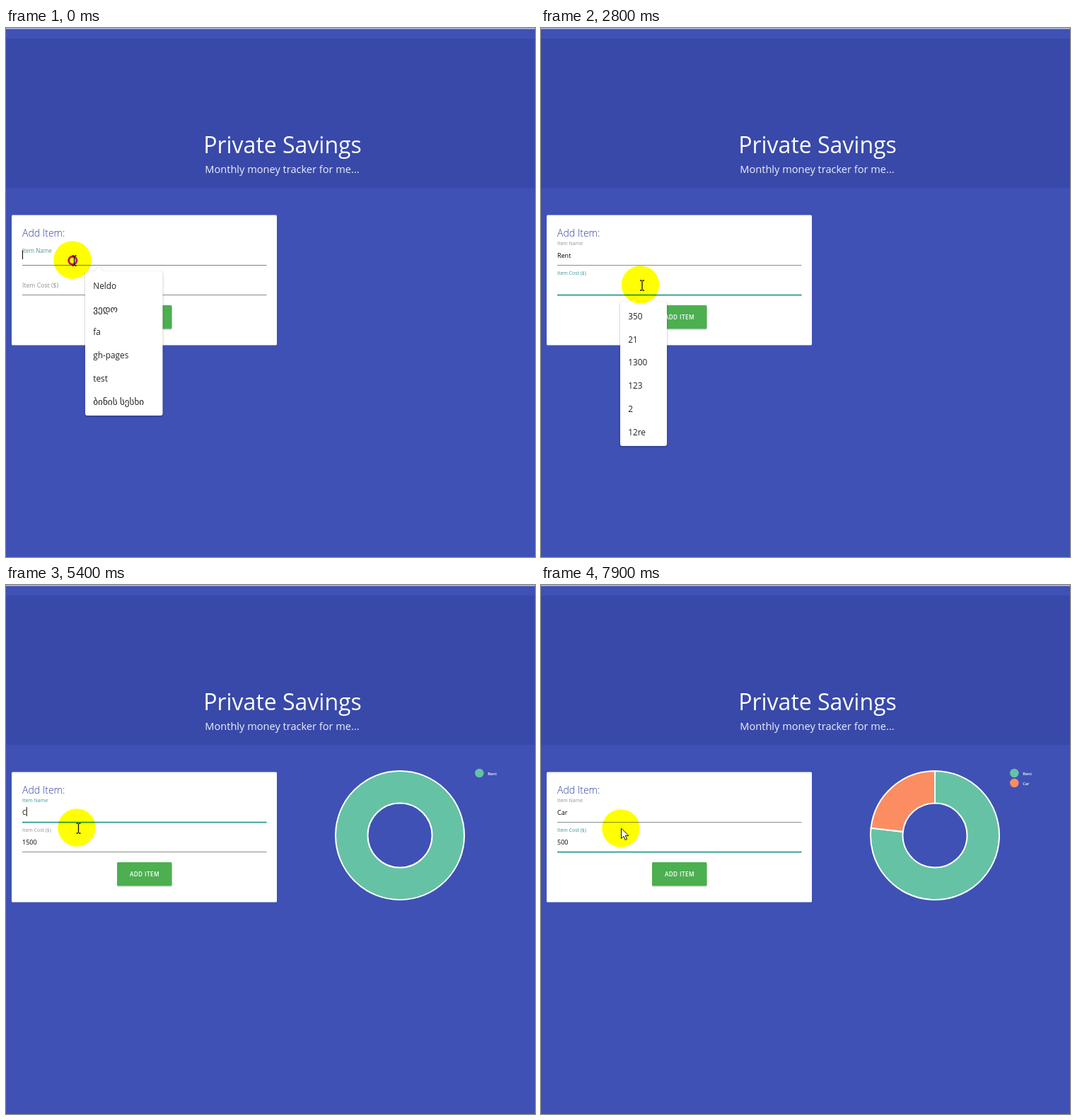
Recreate the animation shown at these times as an HTML page. Size 748x748 px, loop 8 s.

```html
<!DOCTYPE html>
<html lang="en">
<head>
<meta charset="utf-8">
<title>Money tracker</title>
<style>
  html, body { margin: 0; width: 100%; height: 100%; overflow: hidden; background: #3f51b5; }
  svg { display: block; width: 748px; height: 748px; font-family: "Open Sans", "Noto Sans", "DejaVu Sans", sans-serif; }
  text { white-space: pre; }
  .title { font-size: 32px; fill: #fff; text-anchor: middle; }
  .sub { font-size: 14.6px; fill: #eceefa; text-anchor: middle; }
  .head { font-size: 14px; font-weight: 300; fill: #303f9f; }
  .label { font-size: 8.7px; }
  .value { font-size: 9px; fill: #000; }
  .btn { font-size: 8.2px; font-weight: 600; letter-spacing: .4px; fill: #fff; text-anchor: middle; }
  .menu { filter: drop-shadow(0 1px 1.5px rgba(0, 0, 0, .3)); }
  .menu text { font-size: 11.8px; fill: #222; }
  .menu .ka { font-size: 13.2px; }
  .legend text { font-size: 5.6px; font-weight: 600; fill: #fff; }
  .halo { fill: #ff0; mix-blend-mode: multiply; }
  .arc { stroke: #fff; stroke-width: 2; fill-rule: evenodd; }
</style>
</head>
<body>
<svg viewBox="0 0 748 748">
  <rect width="748" height="748" fill="#3f51b5"/>
  <rect y="15" width="748" height="211" fill="#3949a9"/>
  <rect width="748" height="1.5" fill="#b4c0e0"/>
  <text class="title" x="391" y="177">Private Savings</text>
  <text class="sub" x="390.5" y="205">Monthly money tracker for me...</text>

  <rect x="8" y="264.5" width="375" height="184" rx="1.5" fill="#fff"/>
  <text class="head" x="23" y="294.5">Add Item:</text>
  <g id="fields"></g>
  <rect x="157" y="393.5" width="77.5" height="33" rx="1.5" fill="#000" opacity=".22"/>
  <rect x="157" y="392" width="77.5" height="33.3" rx="1.5" fill="#4caf50"/>
  <text class="btn" x="195.9" y="412">ADD ITEM</text>

  <g id="chart" transform="translate(557 354)"></g>
  <g id="legend" class="legend"></g>
  <g id="menus"></g>

  <circle id="halo" class="halo" r="26.7"/>
  <g id="pointer">
    <circle id="ring" cx=".3" cy=".8" r="5.6" fill="none" stroke="#c2185b" stroke-width="3"/>
    <path id="beam" d="M-.5-6h2.4M3.1-6h2.4M2.5-5.5v13M-.5 8h2.4M3.1 8h2.4" fill="none" stroke="#111" stroke-width="1.3"/>
    <path id="arrow" d="M.5 0v14.5l3.4-3.2 2.3 5.2 2.3-1-2.3-5.1h4.6z" fill="#fff" stroke="#111"/>
  </g>
</svg>
<script>
  const LOOP = 8000, STEP = 100, TAU = Math.PI * 2;
  const GREEN = "#66c2a5", ORANGE = "#fc8d62";
  const $ = id => document.getElementById(id);
  const clamp = x => Math.min(1, Math.max(0, x));
  const ramp = (t, start, dur) => clamp((t - start) / dur);
  const inOut = x => x < .5 ? 4 * x ** 3 : 1 - 4 * (1 - x) ** 3;
  const easeOut = x => 1 - (1 - x) ** 2;
  const smooth = x => x * x * (3 - 2 * x);
  const show = (el, on) => el.setAttribute("visibility", on ? "visible" : "hidden");

  function add(parent, tag, attrs, text) {
    const el = document.createElementNS("http://www.w3.org/2000/svg", tag);
    for (const k in attrs) el.setAttribute(k, attrs[k]);
    if (text) el.textContent = text;
    return parent.appendChild(el);
  }

  // [time, field, value after the keystroke or click]
  const inputs = [
    [-40, 0, ""], [850, 0, "R"], [1000, 0, "Re"], [1100, 0, "Ren"], [1200, 0, "Rent"],
    [2250, 1, ""], [3000, 1, "1"], [3100, 1, "15"], [3300, 1, "150"], [3400, 1, "1500"],
    [4720, 0, "Rent"], [5100, 0, ""], [5400, 0, "C"], [5550, 0, "Ca"], [5700, 0, "Car"],
    [6300, 1, "1500"], [6900, 1, "5"], [7000, 1, "50"], [7100, 1, "500"]
  ];
  // [time, x, y]
  const path = [
    [0, 94, 328], [100, 98, 322], [400, 132, 189], [800, 146, 343], [1700, 146, 343],
    [2200, 140.5, 363], [3900, 140.5, 363], [4300, 123, 326.5], [4700, 92, 323],
    [4900, 100, 343], [5450, 100, 343], [5800, 195, 368], [5900, 195, 368],
    [6200, 53, 363], [6300, 53, 363], [6700, 45, 363], [7300, 51, 363], [7900, 113, 344]
  ];
  const presses = [[0, 100], [2250, 2450], [4720, 4850], [6260, 6650]];

  const fields = [
    { y: 335, label: "Item Name", focus: [[-40, 2250], [4720, 6300]] },
    { y: 377, label: "Item Cost ($)", focus: [[2250, 4720], [6300, LOOP]] }
  ];
  for (const f of fields) {
    const g = $("fields");
    add(g, "rect", { x: 23, y: f.y, width: 345.5, height: 1, fill: "#868d8e" });
    f.line = add(g, "rect", { x: 23, y: f.y - .3, width: 345.5, height: 1.8, fill: "#2a9a94" });
    f.name = add(g, "text", { class: "label" }, f.label);
    f.value = add(g, "text", { class: "value", x: 23, y: f.y - 10 });
    f.caret = add(g, "rect", { y: f.y - 21, width: 1, height: 13, fill: "#000" });
  }

  function menu(y, width, rows, from, to) {
    const g = add($("menus"), "g", { class: "menu" });
    add(g, "rect", { x: 112, y, width, height: 204, rx: 3, fill: "#fff" });
    add(g, "path", { d: `M124.5 ${y + .5}l7-7 7 7z`, fill: "#fff" });
    rows.forEach((row, i) => add(g, "text", {
      x: 123.3, y: y + 24.7 + i * 32.8, class: row > "\u1000" ? "ka" : "la"
    }, row));
    return { g, from, to };
  }
  const menus = [
    menu(344, 109.5, ["Neldo", "ვედო", "fa", "gh-pages", "test", "ბინის სესხი"], 0, 850),
    menu(387, 66, ["350", "21", "1300", "123", "2", "12re"], 2350, 3000)
  ];

  function slice(color, label, y, start) {
    const key = add($("legend"), "g", {});
    add(key, "circle", { cx: 669.3, cy: y, r: 6.2, fill: color });
    add(key, "text", { x: 681.3, y: y + 2.7 }, label);
    return { arc: add($("chart"), "path", { class: "arc", fill: color }), key, start };
  }
  const rent = slice(GREEN, "Rent", 266, 3600);
  const car = slice(ORANGE, "Car", 280, 7347);

  function ringPath(a, b) {
    const R = 91, r = 45.5;
    if (b - a > TAU - 1e-6)
      return [R, r].map(q => `M0 ${-q}A${q} ${q} 0 1 1 0 ${q}A${q} ${q} 0 1 1 0 ${-q}Z`).join("");
    const at = (q, n) => `${q * Math.sin(n)} ${-q * Math.cos(n)}`;
    const big = b - a > Math.PI ? 1 : 0;
    return `M${at(R, a)}A${R} ${R} 0 ${big} 1 ${at(R, b)}L${at(r, b)}A${r} ${r} 0 ${big} 0 ${at(r, a)}Z`;
  }

  function pointerAt(t) {
    const i = path.findIndex(p => p[0] > t);
    if (i < 0) return path[path.length - 1].slice(1);
    const [t0, x0, y0] = path[i - 1], [t1, x1, y1] = path[i];
    const k = smooth((t - t0) / (t1 - t0));
    return [x0 + (x1 - x0) * k, y0 + (y1 - y0) * k];
  }

  function drawFields(t) {
    const past = inputs.filter(e => e[0] <= t);
    const [lastTime, active] = past[past.length - 1];
    const blink = (t - lastTime) % 1000 < 500;
    fields.forEach((f, i) => {
      const lit = dur => f.focus.reduce((s, [a, b]) => s + ramp(t, a, dur) - ramp(t, b, dur), 0);
      const up = easeOut(ramp(t, f.focus[0][0], 200));
      const tint = easeOut(lit(100)), mix = (a, b) => Math.round(a + (b - a) * tint);
      f.line.setAttribute("opacity", lit(300));
      f.name.setAttribute("transform", `translate(23 ${f.y - 10.5 - 18 * up}) scale(${1 - .2 * up})`);
      f.name.setAttribute("fill", `rgb(${mix(145, 60)},${mix(145, 150)},${mix(145, 147)})`);
      const mine = past.filter(e => e[1] === i);
      f.value.textContent = mine.length ? mine[mine.length - 1][2] : "";
      show(f.caret, active === i && blink);
      f.caret.setAttribute("x", 23 + (f.value.textContent ? f.value.getComputedTextLength() : 0));
    });
  }

  function drawChart(t) {
    const grow = inOut(ramp(t, rent.start, 750));
    const split = TAU * (1 - inOut(ramp(t, car.start, 750)) / 4);
    rent.arc.setAttribute("d", ringPath(TAU * (1 - grow), split));
    car.arc.setAttribute("d", ringPath(split, TAU));
    for (const s of [rent, car]) {
      show(s.arc, t > s.start);
      show(s.key, t >= s.start);
    }
  }

  function drawPointer(t) {
    const move = `translate(${pointerAt(t).join(" ")})`;
    $("halo").setAttribute("transform", move);
    $("pointer").setAttribute("transform", move);
    show($("ring"), presses.some(([a, b]) => t >= a && t < b));
    show($("beam"), t < 7800);
    show($("arrow"), t >= 7800);
  }

  let origin;
  function frame(now) {
    origin ??= now;
    const t = Math.floor(((now - origin) % LOOP) / STEP) * STEP;
    drawFields(t);
    drawChart(t);
    for (const m of menus) show(m.g, t >= m.from && t < m.to);
    drawPointer(t);
    requestAnimationFrame(frame);
  }
  requestAnimationFrame(frame);
</script>
</body>
</html>
```
